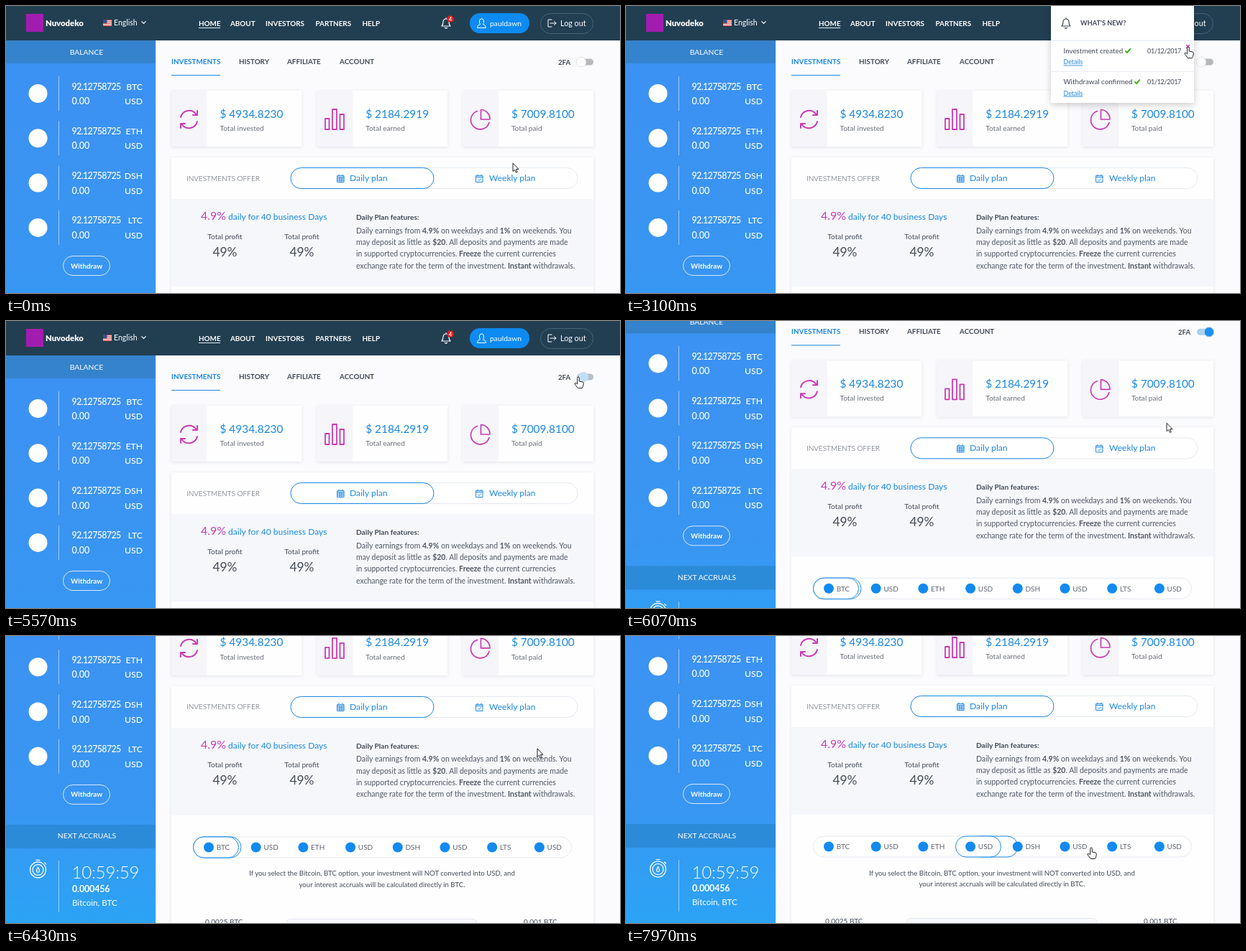
Animation of 854 by 400 pixels, one loop 8 s. Source, as an HTML page:

```html
<!DOCTYPE html>
<html lang="en">
<head>
<meta charset="utf-8">
<title>Investments dashboard</title>
<style>
html, body { margin: 0; width: 100%; height: 100%; overflow: hidden; background: #fbfbfd; }
svg { display: block; width: 854px; height: 400px; font-family: Lato, "Open Sans", sans-serif; }
text { fill: #434a58; }
.b, .b text { font-weight: 700; }
.w, .w text { fill: #fff; }
.blue { fill: #1c88e2; }
.mid { text-anchor: middle; }
.end { text-anchor: end; }
.line { fill: none; stroke: currentColor; stroke-linecap: round; stroke-linejoin: round; }
.card { fill: #fefefe; filter: drop-shadow(0 1px 2px #1020401c); }
.panel { filter: drop-shadow(0 3px 5px #00000030); }

#page, #pill, #ring, #panel, #sheet, #list, #close, #knob, #track, #cursor, #cursor > * {
  animation: 8s linear infinite;
}
#page { animation-name: scroll; }
@keyframes scroll {
  0%, 73.25% { transform: translateY(0); }
  74.5% { transform: translateY(-22px); }
  76% { transform: translateY(-66px); }
  77.5% { transform: translateY(-105px); }
  78.9% { transform: translateY(-130px); }
  80.3% { transform: translateY(-141px); }
  81.5%, 100% { transform: translateY(-142px); }
}

#panel { animation-name: show; }
@keyframes show {
  0%, 12.8% { opacity: 0; }
  13.7%, 45.5% { opacity: 1; }
  45.8%, 100% { opacity: 0; }
}
#sheet { animation-name: shrink; animation-timing-function: step-end; }
@keyframes shrink {
  0% { height: 243px; }
  30.6% { height: 178px; }
  38.1% { height: 135px; }
  42%, 100% { height: 91px; }
}
#list { animation-name: lift; animation-timing-function: step-end; }
@keyframes lift {
  0% { transform: translateY(0); }
  30.6% { transform: translateY(-65px); }
  38.1% { transform: translateY(-108.3px); }
  42%, 100% { transform: translateY(-151.6px); }
}
#close { animation-name: closer; animation-timing-function: step-end; }
@keyframes closer { 0% { opacity: 0; } 25.8% { opacity: 1; } 45.4%, 100% { opacity: 0; } }

#knob { animation-name: knob; }
@keyframes knob {
  0%, 69% { transform: translateX(0); fill: #fdfdfd; }
  69.6% { fill: #c3e2f6; }
  71.2%, 100% { transform: translateX(11px); fill: #1b8ff0; }
}
#track { animation-name: track; }
@keyframes track { 0%, 69% { fill: #b6b8bc; } 71.2%, 100% { fill: #a9d2ee; } }

#ring { animation-name: ring; animation-timing-function: step-end; }
@keyframes ring { 0% { transform: translateX(0); } 93.75%, 100% { transform: translateX(198px); } }
#pill { animation-name: slide; animation-timing-function: ease-out; }
@keyframes slide {
  0%, 93.75% { transform: translateX(0); }
  98.5% { transform: translateX(222px); }
  99.6%, 100% { transform: translateX(218px); }
}

#cursor { animation-name: move; animation-timing-function: ease-in-out; }
@keyframes move {
  0%, .4% { transform: translate(705px, 219px); }
  9.1% { transform: translate(613px, 30px); }
  13%, 16.6% { transform: translate(613px, 26px); }
  26.2%, 50.9% { transform: translate(782px, 57px); }
  56% { transform: translate(802px, 94px); }
  60.9%, 71.6% { transform: translate(796px, 78px); }
  77.5% { transform: translate(744px, 154px); }
  80.3%, 82.1% { transform: translate(739px, 157px); }
  92.1%, 95% { transform: translate(505px, 296px); }
  99.6%, 100% { transform: translate(647px, 295px); }
}
#cursor > * { animation-timing-function: step-end; }
#arrow { animation-name: arrow; }
@keyframes arrow {
  0% { opacity: 1; }
  25.8% { opacity: 0; }
  48.5% { opacity: 1; }
  58.5% { opacity: 0; }
  72.6% { opacity: 1; }
  76.5% { opacity: 0; }
  78.8% { opacity: 1; }
  90%, 100% { opacity: 0; }
}
#hand { animation-name: hand; }
@keyframes hand {
  0% { opacity: 0; }
  25.8% { opacity: 1; }
  48.5% { opacity: 0; }
  58.5% { opacity: 1; }
  72.6% { opacity: 0; }
  90%, 100% { opacity: 1; }
}
#beam { animation-name: beam; }
@keyframes beam { 0% { opacity: 0; } 76.5% { opacity: 1; } 78.8%, 100% { opacity: 0; } }
</style>
</head>
<body>
<svg id="stage" viewBox="0 0 854 400"></svg>
<script>
const blue = '#1c88e2', pale = '#e4e8ef';

const text = (x, y, size, s, attrs = '') => `<text x="${x}" y="${y}" font-size="${size}" ${attrs}>${s}</text>`;
const box = (x, y, w, h, attrs = '') => `<rect x="${x}" y="${y}" width="${w}" height="${h}" ${attrs}/>`;
const dot = (x, y, r, attrs = '') => `<circle cx="${x}" cy="${y}" r="${r}" ${attrs}/>`;
const draw = (x, y, d, color, width = 1) =>
  `<path class="line" transform="translate(${x} ${y})" d="${d}" color="${color}" stroke-width="${width}"/>`;
const row = (items, y, size) => items.map(([x, s]) => text(x, y, size, s)).join('');
const bold = s => `<tspan class="b">${s}</tspan>`;

const bell = (x, color) => draw(x, 24,
  'M-6 4Q-4 2-4-2A4 4 0 0 1 4-2Q4 2 6 4ZM-1.6 6.2Q0 8.2 1.6 6.2M0-7.5V-6', color, 1.2);

function header() {
  const stripes = [0, 1, 2, 3].map(i => box(135, 19 + i * 2.6, 12, 1.3, 'fill="#d8473f"')).join('');
  return box(0, 0, 854, 48, 'fill="#223f52"')
    + box(28, 11, 24, 25, 'fill="#a31cb0"')
    + text(55, 27.5, 11.3, 'Nuvodeko', 'class="w" font-weight="900"')
    + box(135, 19, 12, 9, 'fill="#fff"') + stripes + box(135, 19, 5.5, 5, 'fill="#3a4f88"')
    + text(150, 27, 10.5, 'English', 'class="w"')
    + draw(191.5, 23, 'M-2.7-1.3L0 1.4L2.7-1.3', '#fff', 1.2)
    + `<g class="w b">${row([[268, 'HOME'], [312, 'ABOUT'], [361, 'INVESTORS'], [430.5, 'PARTNERS'], [495.5, 'HELP']], 27.5, 9.9)}</g>`
    + box(268, 30, 30, 1, 'fill="#e8eef0"')
    + bell(612, '#fff')
    + dot(618, 18, 4.7, 'fill="#ee1c1c"') + text(618, 20.7, 7, '4', 'class="w b mid"')
    + box(645, 10, 83, 28, 'rx="14" fill="#0d8bf2"')
    + draw(661.5, 24, 'M-6 6Q-6 2.4-2 1.6Q-3.5-.5-3-3A3 3.2 0 0 1 3-3Q3.5-.5 2 1.6Q6 2.4 6 6Z', '#fff')
    + text(673, 27.5, 10.4, 'pauldawn', 'class="w"')
    + box(743.5, 10.5, 73, 28, 'rx="14" fill="none" stroke="#456577"')
    + draw(759, 24, 'M0-5H-5V5H0M-2 0H6M3.5-2.5L6 0L3.5 2.5', '#fff')
    + text(771, 27.5, 10.8, 'Log out', 'class="w"');
}

function sidebar() {
  const coins = ['BTC', 'ETH', 'DSH', 'LTC'].map((coin, i) => {
    const y = 122 + i * 62.3;
    return dot(44.5, y, 13, 'fill="#fff"')
      + box(73, y - 24, 1, 48, 'fill="#fff" opacity=".5"')
      + text(91.5, y - 5.5, 12.4, '92.12758725', 'letter-spacing="-.6"') + text(190, y - 5.5, 12.2, coin, 'class="end"')
      + text(91.5, y + 15, 12.6, '0.00') + text(190, y + 15, 12.2, 'USD', 'class="end"');
  }).join('');
  return `<linearGradient id="sea" x2="0" y2="1"><stop offset=".2" stop-color="#3c92f2"/>
    <stop offset=".65" stop-color="#3896f2"/><stop offset="1" stop-color="#2ba4f5"/></linearGradient>`
    + box(0, 48, 208, 500, 'fill="url(#sea)"')
    + box(0, 48, 208, 32, 'fill="#3583cd"') + box(0, 404, 208, 33, 'fill="#2c8bd8"')
    + box(208, 48, 1, 500, 'fill="#e6e8ec"')
    + '<g class="w">' + text(112, 67.5, 10.3, 'BALANCE', 'class="mid"')
    + `<g font-weight="500">${coins}</g>`
    + box(79.5, 348.5, 65, 27, 'rx="13.5" fill="none" stroke="#fff" stroke-opacity=".8"')
    + text(112, 365.5, 9.9, 'Withdraw', 'class="mid b"')
    + text(112.5, 423.5, 10.4, 'NEXT ACCRUALS', 'class="mid"')
    + draw(44.5, 467, 'M-11 0A11 11 0 1 0 11 0A11 11 0 1 0-11 0M-7.5 0A7.5 7.5 0 1 0 7.5 0A7.5 7.5 0 1 0-7.5 0M-2.5-13.5H2.5M9-10L11-8M0-3.5Q-4 3 0 3.5Q4 3 0-3.5', '#fff', 1.2)
    + box(73, 454, 1, 72, 'fill="#fff" opacity=".5"')
    + text(91.5, 479.5, 24.2, '10:59:59', 'font-weight="300" letter-spacing="-.25"')
    + text(92, 498, 12.4, '0.000456', 'class="b" letter-spacing="-.1"')
    + text(92, 517, 11.6, 'Bitcoin, BTC') + '</g>';
}

function summary() {
  const pink = '#c83cb4';
  const loop = 'M-11.5-3A12 12 0 0 1 10-7M11.5-12V-6H5.5';
  const icons = [
    [254.5, (x, y) => draw(x, y, loop, pink, 2) + `<g transform="rotate(180 ${x} ${y})">${draw(x, y, loop, pink, 2)}</g>`],
    [457, (x, y) => draw(x, y, 'M-13-1h5.5v15h-5.5zM-3-14h6v28h-6zM7.5-7h5.5v21h-5.5z', pink, 1.8)],
    [659.5, (x, y) => draw(x, y, 'M-4-11.5A13 13 0 1 0 12.5 4.5M1-13.5V0H13.5A13 13 0 0 0 1-13.5', pink, 1.7)]
  ];
  const cards = [['4934.8230', 'invested'], ['2184.2919', 'earned'], ['7009.8100', 'paid']].map(([sum, name], i) => {
    const x = 230 + i * 202.7;
    return box(x, 118, 181.5, 78, 'class="card"') + box(x, 118, 49.5, 78, 'fill="#f6f5fa"')
      + icons[i][1](icons[i][0], 158)
      + text(x + 67.5, 155.5, 15.4, '$ ' + sum, 'class="blue"')
      + text(x + 67.5, 174, 10.1, 'Total ' + name, 'fill-opacity=".8"');
  }).join('');
  return `<g class="b">${text(230, 80.5, 9.9, 'INVESTMENTS', 'class="blue"')}`
    + row([[324, 'HISTORY'], [391, 'AFFILIATE'], [464, 'ACCOUNT']], 80.5, 9.9)
    + text(768, 82, 9.6, '2FA') + '</g>'
    + box(230, 96, 68, 1, `fill="${blue}"`)
    + box(794, 73.5, 23, 9, 'rx="4.5" id="track"')
    + dot(800, 78, 6.8, 'id="knob" stroke="#d9dadc" stroke-width=".8"') + cards;
}

function offer() {
  const calendar = (x, mark) => draw(x, 240.5, 'M-4.5-4H4.5V5H-4.5ZM-4.5-2H4.5M-2.5-5.5V-4M2.5-5.5V-4' + mark, blue);
  const lines = [
    `Daily earnings from ${bold('4.9%')} on weekdays and ${bold('1%')} on weekends. You`,
    `may deposit as little as ${bold('$20')}. All deposits and payments are made`,
    `in supported cryptocurrencies. ${bold('Freeze')} the current currencies`,
    `exchange rate for the term of the investment. ${bold('Instant')} withdrawals.`
  ];
  const profit = x => text(x, 324.5, 10.2, 'Total profit', 'class="mid"') + text(x, 348.5, 17.4, '49%', 'class="mid"');
  return box(230, 211, 587, 340, 'class="card"') + box(230, 269, 587, 122, 'fill="#f5f7fb"')
    + text(251, 243.5, 10.1, 'INVESTMENTS OFFER', 'font-weight="300"')
    + box(396, 225.5, 399, 29, `rx="14.5" fill="#fff" stroke="${pale}"`)
    + box(396, 225.5, 199, 29, `rx="14.5" fill="#fff" stroke="${blue}"`)
    + calendar(465.5, 'M-4.5 .3H4.5M-4.5 2.6H4.5M-1.5-2V5M1.5-2V5') + text(478, 244, 12.2, 'Daily plan', 'class="blue"')
    + calendar(658.5, 'M-2 1.5L-.5 3L2.3 0') + text(672, 244, 12, 'Weekly plan', 'class="blue"')
    + text(271, 298, 16, '4.9%', 'style="fill:#c83cb4"')
    + text(309, 298, 12.1, 'daily for 40 business Days', 'class="blue"')
    + profit(304.5) + profit(411.5)
    + text(487, 298, 10.2, 'Daily Plan features:', 'class="b"')
    + lines.map((s, i) => text(487, 316.5 + i * 16.35, 10.5, s, 'fill-opacity=".92"')).join('');
}

function picker() {
  const names = ['BTC', 'USD', 'ETH', 'USD', 'DSH', 'USD', 'LTS', 'USD'];
  const coins = names.map((name, i) => {
    const x = 282 + i * 65.7;
    return dot(x, 435.5, 7, 'fill="#128af0"') + text(x + 10.7, 439.3, 10, name, 'fill-opacity=".85"');
  }).join('');
  const outline = `rx="14.5" fill="#fff" stroke="${blue}"`;
  return box(260.5, 421, 526, 29, `rx="14.5" fill="#fff" stroke="${pale}"`)
    + box(260.5, 421, 66.5, 29, outline + ' id="pill"') + box(260.5, 421, 63, 29, outline + ' id="ring"') + coins
    + text(523, 475.5, 9.65, 'If you select the Bitcoin, BTC option, your investment will NOT converted into USD, and', 'class="mid"')
    + text(523, 491, 9.65, 'your interest accruals will be calculated directly in BTC.', 'class="mid"')
    + text(277, 543, 10, '0.0025 BTC') + text(720, 543, 10, '0.001 BTC')
    + box(390, 535.5, 265, 40, `rx="6" fill="#f8f9fc" stroke="${pale}"`);
}

function news() {
  const item = (y, name, gap, tick) => text(608.5, y, 9.8, name)
    + text(772, y, 9.2, '01/12/2017', 'class="end" letter-spacing="-.4"')
    + (tick ? draw(tick, y - 3.5, 'M-3 .3L-1 2.5L3.3-2.5', '#3fb510', 2) : '')
    + text(608.5, y + gap, 8.8, 'Details', 'class="blue" text-decoration="underline"');
  const rule = y => box(591, y, 199, 1, `fill="${pale}"`);
  return '<g id="panel" class="panel">' + box(591, 0, 199, 243, 'id="sheet" fill="#fff"')
    + '<g id="list">' + item(66.3, 'Bitcoin Cash', 36.5)
    + text(608, 82, 9, 'You can now send, receive, exchange,') + text(608, 92.7, 9, 'and manage wallets with Bitcoin Cash!')
    + rule(112.5) + item(131, 'Profit accruals', 15.5, 677)
    + rule(155.8) + item(174.3, 'Investment created', 15.5, 698)
    + rule(199) + item(217.5, 'Withdrawal confirmed', 15.5, 711) + '</g>'
    + box(591, 0, 199, 48, 'fill="#fff"') + rule(47.5)
    + bell(612, '#434a58') + text(632, 27.3, 9.2, "WHAT'S NEW?", 'class="b"')
    + `<g id="close">${draw(781.5, 56.5, 'M-2-2L2 2M2-2L-2 2', '#c83cb4', 1.5)}</g></g>`;
}

const cursor = `<g id="cursor" stroke="#222" stroke-linejoin="round">
  <path id="arrow" fill="#fff" d="M0 0V11.5L2.6 9.2L4.4 13.2L6.2 12.4L4.5 8.5H8Z"/>
  <path id="hand" fill="#fff" d="M-1.3 1.3a1.3 1.3 0 0 1 2.6 0V6l4.6 1q1.6.4 1.4 2.2l-.8 4.3L5.4 15.5H-.6L-4.8 10q-.6-1.6 1-1.9l2.5 1.7Z"/>
  <path id="beam" fill="none" d="M-2.5-5.5H2.5M0-5.5V5.5M-2.5 5.5H2.5"/></g>`;

document.getElementById('stage').innerHTML = box(0, 0, 854, 400, 'fill="#fbfbfd"')
  + `<g id="page">${sidebar()}${header()}${summary()}${offer()}${picker()}${news()}</g>` + cursor;
</script>
</body>
</html>
```
